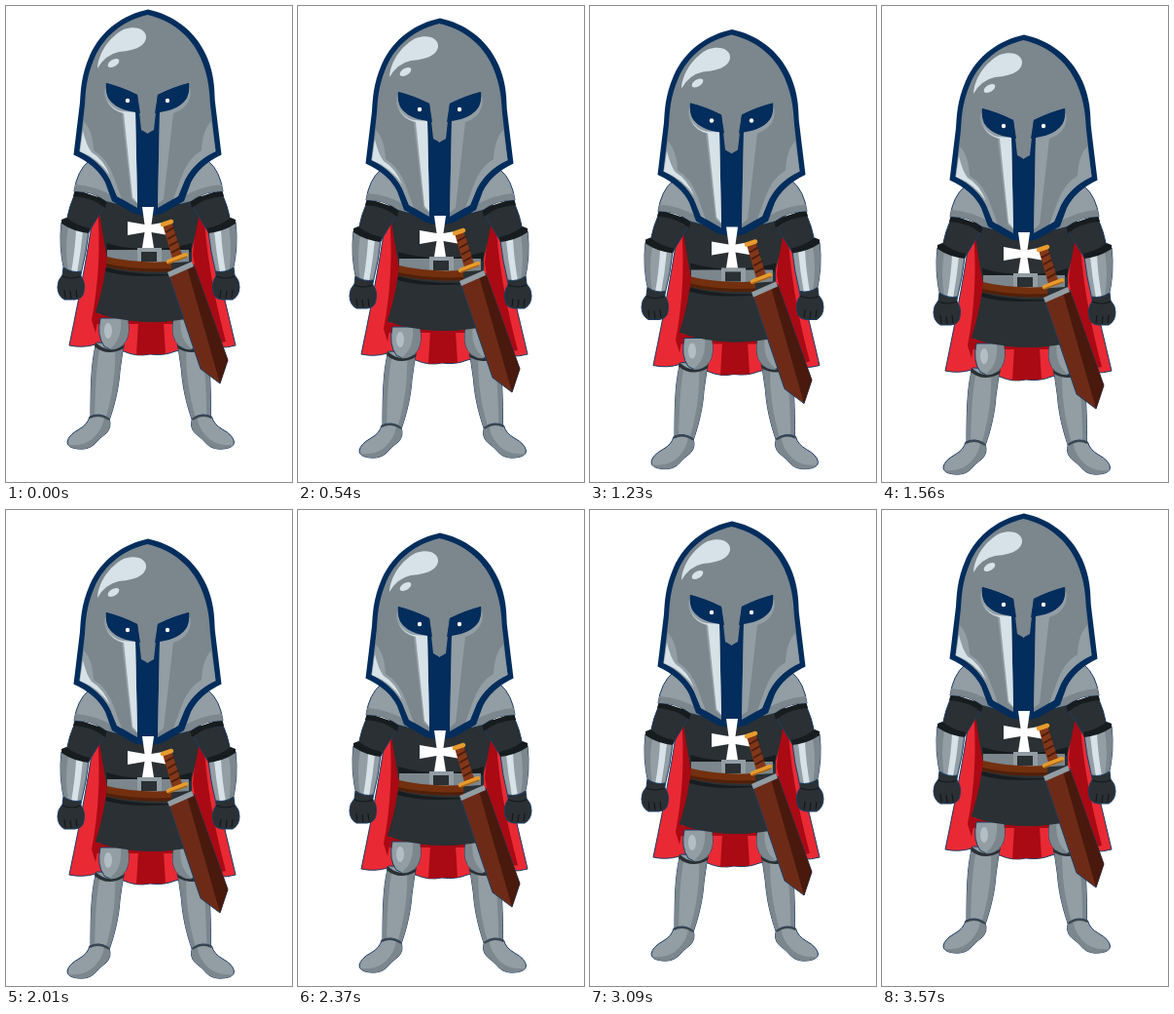
An HTML page that plays this animation: 294x488 px, repeating every 3.6 s.

```html
<!DOCTYPE html>
<html lang="en">
<head>
<meta charset="utf-8">
<title>Knight</title>
<style>
html, body { margin: 0; width: 100%; height: 100%; overflow: hidden; background: #fff; }
svg { display: block; width: 294px; height: 488px; }
.navy { fill: #032d5c; }
.steel { fill: #7b868d; }
.mid { fill: #929da4; }
.pale { fill: #d6e2e7; }
.dark { fill: #2a3033; }
.black { fill: #171c1f; }
.edge { stroke: #1c3c62; stroke-width: 1; stroke-linejoin: round; }
</style>
</head>
<body>
<svg viewBox="0 0 294 488">
<defs>
  <g id="leg">
    <path class="mid edge" d="M93 345C88 363 87 385 87 422L106 425C112 408 116 390 117 374L121 346Z"/>
    <path class="steel" d="M93 345C88 363 87 385 87 422L91 423C92 395 92 372 97 348ZM112 348Q114 384 102 424L106 425C112 408 116 390 117 374L121 346Z"/>
    <path class="mid edge" d="M86 421Q96 416 106 423Q109 432 103 438Q96 443 90 450Q84 455 74 454Q63 453 63 447Q64 440 75 434Q84 429 86 421Z"/>
    <path class="steel" d="M106 423Q109 432 103 438Q96 443 90 450Q84 455 74 454Q66 453 64 450Q84 452 94 438Q100 431 101 421Z"/>
    <path d="M86 422Q96 417 106 424" fill="none" stroke="#3a464e" stroke-width="2"/>
    <path class="dark" d="M92 345Q106 358 122 347L121 351Q104 360 91 349Z"/>
    <path class="mid edge" d="M97 320H125Q128 335 123 344Q112 357 101 349Q93 338 97 320Z"/>
    <path class="steel" d="M118 320H125Q128 335 123 344Q115 354 106 352Q120 342 118 320Z"/>
    <ellipse cx="105" cy="333" rx="4" ry="8" fill="#b3bec4"/>
  </g>
  <g id="arm">
    <path class="dark edge" d="M71 192Q65 205 62 221L85 232L103 202Z"/>
    <path class="mid edge" d="M57 222Q69 231 85 231Q83 251 77 275L60 272Q54 247 57 222Z"/>
    <path class="steel" d="M57 222L64 226Q60 248 64 273L60 272Q54 247 57 222Z"/>
    <path class="pale" d="M72 230L79 231Q77 252 73 274L67 273Q71 250 72 230Z"/>
    <path class="black" d="M62 217Q72 225 86 228L85 233Q69 231 57 223V219Z"/>
    <path class="dark edge" d="M59 268Q68 274 77 272L77 277Q82 283 80 293Q79 300 71 301L60 301Q53 297 53 288Q53 281 58 276Z"/>
    <path d="M58 277Q67 281 77 277M60 291L61 299M66 292L67 300M72 291L73 299" fill="none" stroke="#15191c" stroke-width="1.2"/>
    <path class="black" d="M71 188L104 199L102 207Q88 196 69 195Z"/>
    <path class="mid edge" d="M85 159Q73 169 70 190Q88 189 103 200L115 203V170Z"/>
    <path class="steel" d="M71 183Q91 184 112 196L115 203L103 200Q88 189 70 190Z"/>
  </g>
  <g id="cheek">
    <path class="steel" d="M146 9C122 14 101 30 91 53C82 74 82 88 81 101L75.500 149Q97 159 107 178L114 195L135 207L133 108Q112 106 105 94Q102 87 103 79Q119 83 135 91L139 127L146 131Z"/>
    <path class="mid" d="M103 80Q99 90 104 99Q109 107 119 110L129 198L135 203L133 108Q112 106 105 94Q102 87 103 80Z"/>
    <path class="mid" d="M80 118Q89 127 90 148Q104 156 111 176L119 198L114 195L107 178Q97 159 75.500 149Z"/>
    <path class="navy" d="M103 79Q119 83 135 91L138 110L133 109Q112 106 105 94Q102 87 103 79Z"/>
    <circle cx="125" cy="97" r="2.200" fill="#fff"/>
  </g>
</defs>
<g id="knight">
  <path class="edge" fill="#e92a35" d="M91 203Q84 257 65 348Q79 351 92 347Q106 354 121 354Q134 360 148 357Q162 359 174 354Q187 352 199 346Q219 353 236 348Q224 300 214 250L204 203Z"/>
  <path fill="#a90a14" d="M94 205Q99 265 88 322L92 335L106 255L100 205ZM203 205Q206 270 226 344L216 346Q203 318 192 255L197 205Z"/>
  <path fill="#a90a14" d="M93 316H198V326H93ZM136 324H162L164 357L148 357L134 358Z"/>
  <path class="dark" d="M94 195Q108 187 147 187Q187 187 201 195Q198 222 191 250Q190 285 200 318Q174 324 147 324Q114 323 92 314Q102 284 104 259Q97 222 94 195Z"/>
  <path class="black" d="M103 243Q122 249 147 249Q172 249 191 243L190 252L104 252ZM103 268Q130 276 169 275L172 280Q128 281 102 272Z"/>
  <use href="#leg"/>
  <use href="#leg" transform="matrix(-1 0 0 1 297.5 0)"/>
  <path class="dark" d="M102 272Q132 281 190 274Q193 300 200 318Q174 324 147 324Q114 323 92 314Q99 293 102 272Z"/>
  <path class="steel" d="M104 250H188V262Q147 266 104 262Z"/>
  <path class="mid" fill-rule="evenodd" d="M135 248H160V267H135ZM139 252V262H155V252Z"/>
  <path class="dark" d="M139 252H155V262H139Z"/>
  <path fill="#73300f" d="M104 257Q132 264 170 262L170 272Q130 274 103 267Z"/>
  <path fill="#51200a" d="M103 264Q132 271 170 269V272Q130 274 103 267Z"/>
  <use href="#arm"/>
  <use href="#arm" transform="matrix(-1 0 0 1 293 0)"/>
  <g id="helmet">
    <path class="navy" d="M146 3.500C121 9 98 24 86 51C77 72 77 86 76 99L69.500 152.500Q93 163 102 181L109 200L132 213Q146 217 160 213L183 200L190 181Q199 163 221.500 152.500L215 99C214 86 215 72 206 51C194 24 171 9 146 3.500Z"/>
    <use href="#cheek"/>
    <use href="#cheek" transform="matrix(-1 0 0 1 291 0)"/>
    <path class="pale" d="M104 96Q109 106 119 108L133 109L135 202L130 196L121 110Q108 107 104 96Z"/>
    <path class="pale" d="M79 128Q83 144 88 150Q100 157 107 174Q96 157 76 149Z"/>
    <path class="pale" d="M94 64C95 48 106 32 121 24C135 19 145 25 144 33C142 43 129 46 116 47Q102 50 94 64Z"/>
    <ellipse class="pale" cx="110.500" cy="58.500" rx="6.500" ry="3.600" transform="rotate(-32 110.5 58.5)"/>
  </g>
  <path fill="#fff" d="M140 206H152L149.500 224L167 221V235L149.500 232L152 248H140L142.500 232L125 235V221L142.500 224Z"/>
  <g id="sword">
    <path class="edge" fill="#6d2b17" d="M167 275L193 265L228 363L220 387L200 372Z"/>
    <path fill="#49190d" d="M186 268L193 265L228 363L220 387Z"/>
    <path class="mid" d="M166 273L191 262L193 267L168 278Z"/>
    <path fill="#823719" d="M161 224L170 221L181 255L171 259Z"/>
    <path d="M164 232L173 227M166 239L175 234M168 246L177 241M170 253L179 248" stroke="#4b1c0e" stroke-width="2"/>
    <path d="M161 224L170 221M167 262L185 255" stroke="#e69b2d" stroke-width="4.500" stroke-linecap="round"/>
    <path d="M167 264L186 257" stroke="#a96418" stroke-width="1.500"/>
  </g>
</g>
</svg>
<script>
const LOOP = 3600, TURN = 1800, DEPTH = 30;
const knight = document.getElementById('knight');
const start = performance.now();

// Half-pixel steps going down, whole-pixel steps coming back.
function offset(t) {
  if (t < TURN + 30) return Math.floor(t / 30) / 2;
  return Math.max(0, DEPTH - 1 - Math.floor((t - TURN - 30) / 60));
}

function draw(now) {
  const t = Math.max(0, now - start) % LOOP;
  knight.setAttribute('transform', `translate(0 ${offset(t)})`);
  requestAnimationFrame(draw);
}
draw(start);
</script>
</body>
</html>
```
